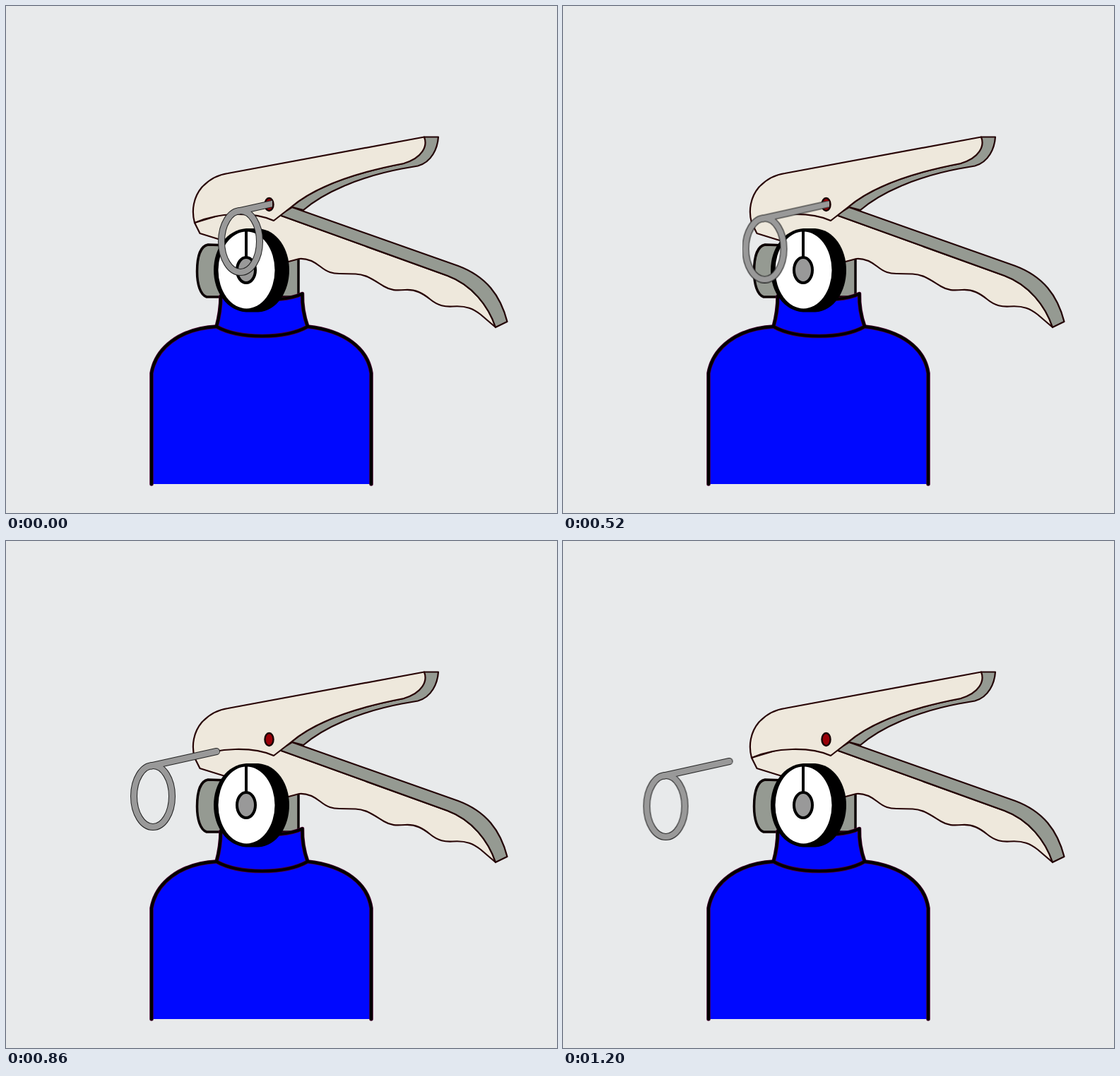
Animation, 780 px wide and 718 px high, one loop 2000 ms. Source, as an HTML page:

```html
<!DOCTYPE html>
<html lang="en">
<head>
<meta charset="utf-8">
<title>Pulling the safety pin</title>
<style>
  html, body { margin: 0; width: 100%; height: 100%; overflow: hidden; background: #e8eaeb; }
  svg { display: block; width: 780px; height: 718px; }
  path, ellipse { stroke-linejoin: round; stroke-linecap: round; }
  .blue { fill: #0008ff; }
  .valve { fill: #959a92; stroke: #0c0203; stroke-width: 3.5; }
  .steel { fill: #959a92; stroke: #220405; stroke-width: 2.2; }
  .cream { fill: #eee8dc; stroke: #280506; stroke-width: 2.2; }
  .line { fill: none; stroke: #000; stroke-width: 4; }
  .fringe { fill: none; stroke: #4a0030; stroke-width: 5.5; }
  .edge { fill: none; stroke: #222; stroke-width: 10; }
  .metal { fill: none; stroke: #999; stroke-width: 8; }

  /* The pin slides out along its rod in twelve equal jumps. */
  #pin { animation: pull 2s step-end infinite; }
  @keyframes pull {
    0%  { transform: translate(0, 0); }
    17% { transform: translate(-15.5px, 3.5px); }
    22% { transform: translate(-31px, 7px); }
    26% { transform: translate(-46.5px, 10.5px); }
    29% { transform: translate(-62px, 14px); }
    33% { transform: translate(-77.5px, 17.5px); }
    36% { transform: translate(-93px, 21px); }
    40% { transform: translate(-108.5px, 24.5px); }
    43% { transform: translate(-124px, 28px); }
    47% { transform: translate(-139.5px, 31.5px); }
    51% { transform: translate(-155px, 35px); }
    55% { transform: translate(-170.5px, 38.5px); }
    59%, 100% { transform: translate(-186.5px, 42px); }
  }
</style>
</head>
<body>
<svg viewBox="0 0 780 718">
  <defs>
    <clipPath id="outside"><path d="M0 0H377V718H0Z"/></clipPath>
    <path id="shoulders" d="M206 677V520C212 485 245 457 298 454M427 454C480 460 512 485 517 520V677"/>
    <path id="neck" d="M304 411C304 430 301 443 298 454C330 472 395 472 427 454C422 440 419 425 419.500 407.500C410 412 400 414 388 415Z"/>
    <g id="pinShape">
      <ellipse cx="332" cy="333.500" rx="27" ry="43.500"/>
      <path d="M329.500 290.500L422 270"/>
    </g>
  </defs>

  <!-- valve -->
  <path class="valve" d="M345 345H414V412H345Z"/>
  <path class="valve" d="M315 339L286 338C275 340 270.500 356 270.500 376C270.500 394 275 409 284 412H315Z"/>

  <!-- bottle -->
  <path class="blue" d="M206 677V520C212 485 245 457 298 454H427C480 460 512 485 517 520V677Z"/>
  <use href="#neck" class="blue"/>
  <use href="#shoulders" class="fringe"/>
  <use href="#neck" class="fringe"/>
  <use href="#shoulders" class="line"/>
  <use href="#neck" class="line"/>

  <!-- lower lever -->
  <path class="cream" d="M267 307L274.500 322L310 333L340 362H400L415 358C426 357 435 361 445 369C455 377 462 379 472 379L495 379.500C510 380 520 388 535 397C545 403 552 403 565 402C580 401 590 407 600 415C612 425 622 426 632 425.500C652 424 662 429 672 437L693 455C683 425 660 395 625 382L387 296L340 285Z"/>
  <path class="steel" d="M387 296L405 285L640 368C680 383 700 410 709.500 447L693 455C683 425 660 395 625 382Z"/>

  <!-- upper lever -->
  <path class="steel" d="M592 185.500H612C611 201 603 221 583 226.500L560 230.500C500 242 450 264 421 289L404 284.500C440 254 500 235 563 223Z"/>
  <path class="cream" d="M267 307C262 289 266 270 277 257C287 246 300 239 314 237L592 185.500C597 198 590 215 563 223C500 235 440 254 404 284.500L379 304C350 291 300 292 267 307Z"/>
  <ellipse cx="372.500" cy="281" rx="6" ry="9" fill="#990008" stroke="#1a0304" stroke-width="2.500"/>

  <!-- gauge -->
  <path d="M340 315H357C384 317 401 344 401 374C401 404 384 432 357 433.500H340C313 432 294 405 294 374C294 343 313 317 340 315Z"/>
  <ellipse cx="340.500" cy="374" rx="40" ry="54.500" fill="#fff"/>
  <path class="line" style="stroke-linecap:butt" d="M340 319V358"/>
  <ellipse cx="340" cy="374" rx="13" ry="18" fill="#999" stroke="#000" stroke-width="4"/>

  <!-- pin -->
  <g clip-path="url(#outside)">
    <g id="pin">
      <use href="#pinShape" class="edge"/>
      <use href="#pinShape" class="metal"/>
    </g>
  </g>
</svg>
</body>
</html>
```
